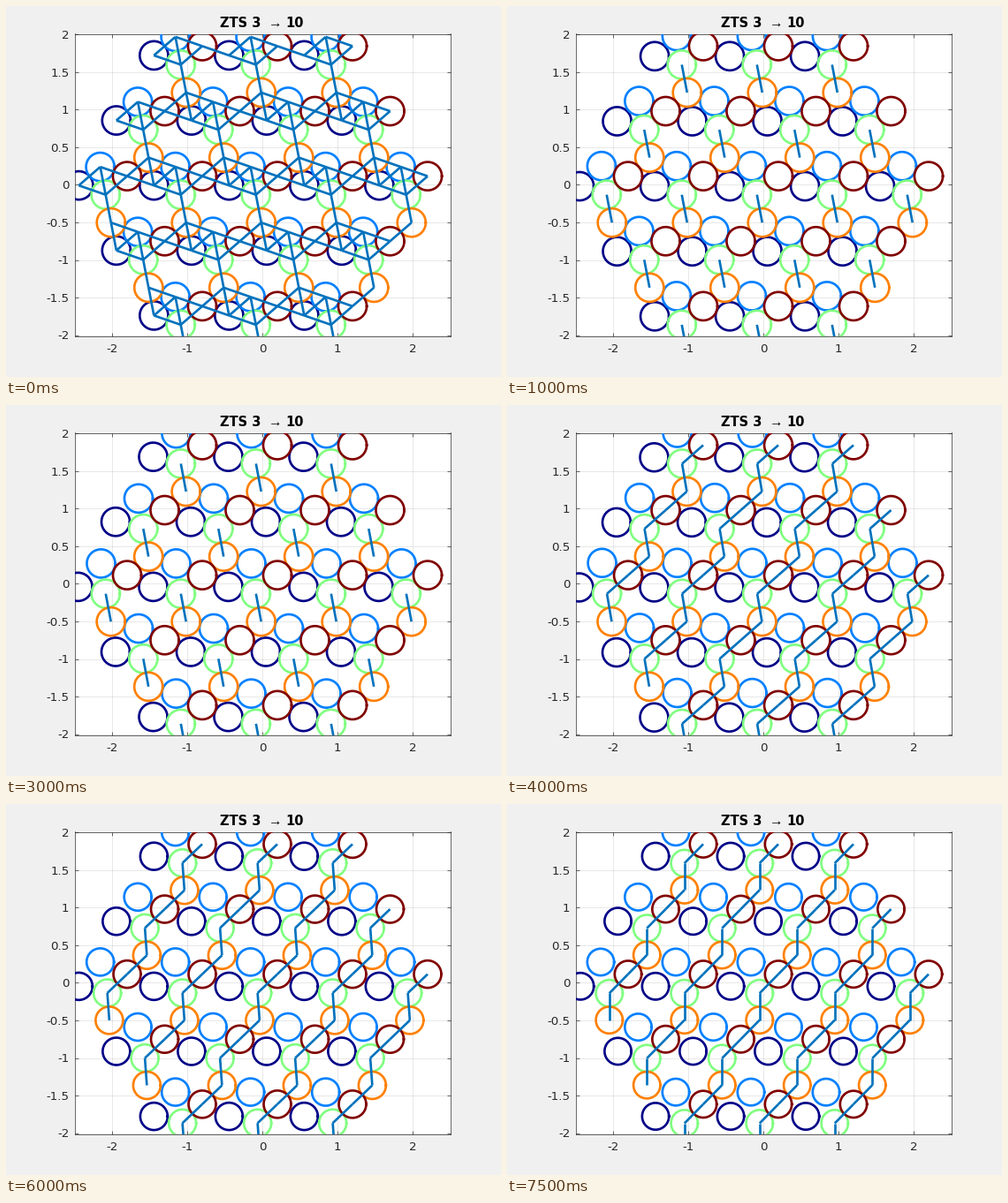
Recreate the animation shown at these times as a matplotlib script. Size 560 by 420 pixels, loop 8000 ms.

```python
import numpy as np
import matplotlib.pyplot as plt
from matplotlib.animation import FuncAnimation
from matplotlib.collections import LineCollection

W, H, DPI = 560, 420, 100
FRAMES, STEP = 16, 500
PT = 72 / DPI                       # points per pixel
SCALE = 85                          # pixels per data unit
LEFT, RIGHT, TOP, BOTTOM = 77.5, 502.5, 31.5, 373.5
DARK = "#262626"
COLORS = ["#000087", "#0080ff", "#80ff80", "#ff8000", "#800000"]

A1 = np.array([1.0, 0.0])
A2 = np.array([0.5, np.sqrt(3) / 2])
RED = np.array([0.2, 0.116])        # pinned disk
CELLS = [(i, j) for j in range(-2, 3) for i in range(-2, 3) if abs(i + j) <= 2]

# Bonds: (disk, disk, cell shift of the second disk)
CHAIN = [(2, 3, (0, 0))]
ZIGZAG = CHAIN + [(4, 2, (0, 0)), (3, 4, (0, -1))]
PACKED = ZIGZAG + [(0, 1, (0, 0)), (1, 2, (0, 0)), (0, 2, (0, 0)),
                   (1, 4, (0, 0)), (4, 0, (1, 0)),
                   (3, 1, (1, -1)), (3, 0, (1, -1))]


def place(i, j):
    return i * A1 + j * A2


def layout(t):
    """Disk centres in one cell and the contact distance at t seconds."""
    keys = [0, 3.7, 7.5]
    angle = np.radians(np.interp(t, keys, [100.9, 100.5, 90]))
    navy = np.array([np.interp(t, keys, [-0.4428, -0.455, -0.435]),
                     np.interp(t, keys, [-0.0077, -0.047, -0.045])])
    mid = RED - A2 / 2
    # equal links red-green-orange-red spanning one lattice vector
    c = np.cos(angle - np.pi / 3) / 2
    d = (-c + np.sqrt(c * c + 0.75)) / 1.5
    arm = d / 2 * np.array([np.cos(angle), np.sin(angle)])
    blue = 2 * mid + A2 - A1 - navy
    return [navy, blue, mid + arm, mid - arm, RED], d


def bonds(t):
    if t == 0:
        return PACKED
    return CHAIN if t < 3.5 else ZIGZAG


fig = plt.figure(figsize=(W / DPI, H / DPI), dpi=DPI, facecolor="#f0f0f0")
ax = fig.add_axes([LEFT / W, 1 - BOTTOM / H, (RIGHT - LEFT) / W, (BOTTOM - TOP) / H])
ylim = (BOTTOM - TOP) / 2 / SCALE
ax.set(xlim=(-2.5, 2.5), ylim=(-ylim, ylim))
ax.set_xticks(np.arange(-2, 3))
ax.set_yticks(np.arange(-2, 2.1, 0.5))
ax.set_axisbelow(True)
ax.grid(color=DARK, alpha=0.15, lw=0.67 * PT)
ax.tick_params(direction="in", length=4.3 * PT, width=0.67 * PT, color=DARK,
               top=True, right=True, labelbottom=False, labelleft=False)
for s in ax.spines.values():
    s.set(color=DARK, linewidth=0.67 * PT)


def label(x, y, text, px, **kw):
    style = dict(family="DejaVu Sans", color=DARK, ha="center", va="baseline")
    fig.text(x / W, 1 - y / H, text, fontsize=px * PT, **{**style, **kw})


for v in ax.get_xticks():
    label(290 + SCALE * v, 392, f"{v:g}", 13.33)
for v in ax.get_yticks():
    label(71.5, 207.3 - SCALE * v, f"{v:g}", 13.33, ha="right")

bold = dict(weight="bold", color="black")
label(242.5, 24, "ZTS 3", 14.67, ha="left", **bold)
label(305, 24, "\u2192", 15.5, family="Liberation Serif", color="black")
label(337, 24, "10", 14.67, ha="right", **bold)

LW = 2.67 * PT
rings = [ax.plot([], [], color=c, lw=LW, zorder=3)[0] for c in COLORS]
links = LineCollection([], colors="#0072bd", linewidths=LW, zorder=4)
ax.add_collection(links, autolim=False)

phi = np.linspace(0, 2 * np.pi, 73)
CIRCLE = np.vstack([np.column_stack([np.cos(phi), np.sin(phi)]), [np.nan, np.nan]])


def draw(n):
    t = n * STEP / 1000
    disks, d = layout(t)
    for ring, p in zip(rings, disks):
        xy = np.vstack([place(*c) + p + d / 2 * CIRCLE for c in CELLS])
        ring.set_data(xy[:, 0], xy[:, 1])
    segs = []
    for a, b, (di, dj) in bonds(t):
        for i, j in CELLS:
            other = (i + di, j + dj)
            if other in CELLS:
                segs.append([place(i, j) + disks[a], place(*other) + disks[b]])
    links.set_segments(segs)
    return [*rings, links]


anim = FuncAnimation(fig, draw, frames=FRAMES, interval=STEP, repeat=True,
                     repeat_delay=0, init_func=lambda: draw(0))
plt.show()
```
